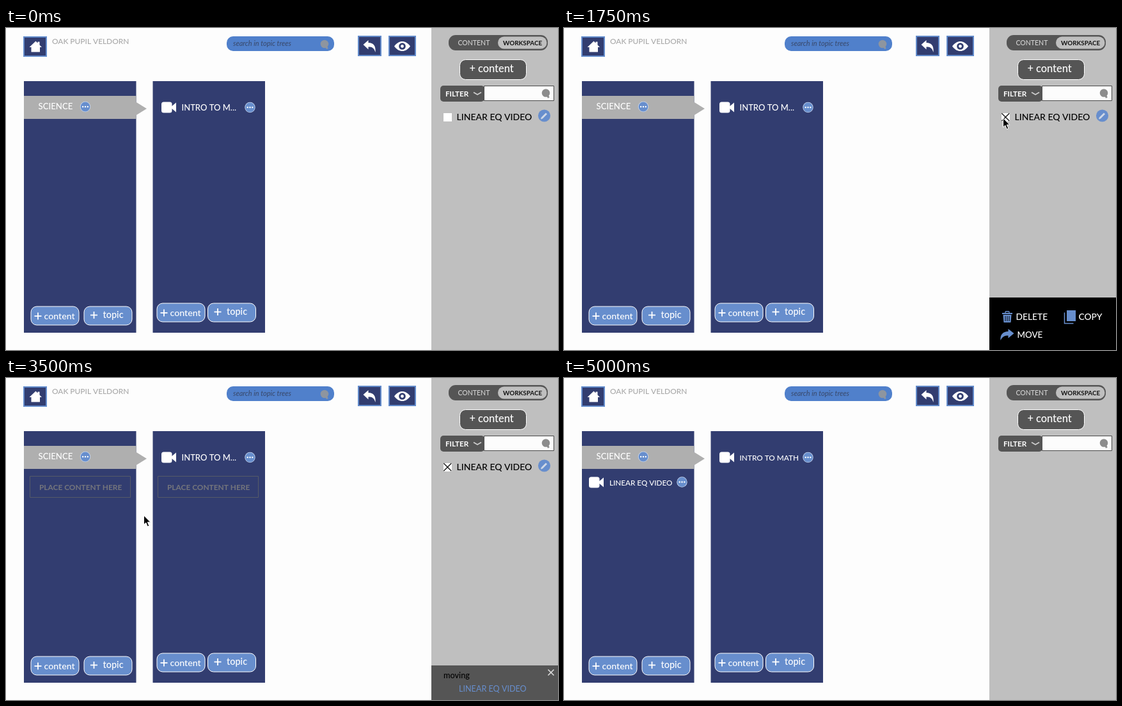
Animation, 863 px wide and 503 px high, one loop 5750 ms. Source, as an HTML page with a canvas:

```html
<!DOCTYPE html>
<html lang="en">
<head>
<meta charset="utf-8">
<title>Topic tree workspace</title>
<style>
  html, body { margin: 0; width: 100%; height: 100%; overflow: hidden; background: #fdfdfd; }
  canvas { display: block; }
</style>
</head>
<body>
<canvas id="stage" width="863" height="503"></canvas>
<script>
const ctx = document.getElementById('stage').getContext('2d');
const LOOP = 5750;
const NAVY = '#323d70', BLUE = '#678ecd', GREY = '#bfbfbf', DARK = '#555', WHITE = '#fff';

// Pointer stops: time, x, y. The pointer jumps between them.
const STOPS = [
  [500, 636, 27], [750, 698, 134], [1000, 693, 139], [1250, 688, 140],
  [1500, 685, 140], [1750, 686, 140], [2000, 685, 141], [2250, 721, 419],
  [2500, 720, 476], [2750, 722, 482], [3250, 481, 387], [3500, 215, 214],
  [3750, 148, 168], [4500, 157, 146]
];
const CHECKED = 1750, MOVING = 3250, PLACED = 4250, POINTER_END = 4750;

function rect(x, y, w, h, fill) {
  ctx.fillStyle = fill;
  ctx.fillRect(x, y, w, h);
}

function box(x, y, w, h, r, fill, stroke, width = 1) {
  ctx.beginPath();
  ctx.roundRect(x, y, w, h, r);
  if (fill) { ctx.fillStyle = fill; ctx.fill(); }
  if (stroke) { ctx.strokeStyle = stroke; ctx.lineWidth = width; ctx.stroke(); }
}

function disc(x, y, r, fill) {
  ctx.beginPath();
  ctx.arc(x, y, r, 0, Math.PI * 2);
  ctx.fillStyle = fill;
  ctx.fill();
}

function poly(points, fill) {
  ctx.beginPath();
  points.forEach(([x, y]) => ctx.lineTo(x, y));
  ctx.closePath();
  ctx.fillStyle = fill;
  ctx.fill();
}

function line(x1, y1, x2, y2, color, width) {
  ctx.beginPath();
  ctx.moveTo(x1, y1);
  ctx.lineTo(x2, y2);
  ctx.strokeStyle = color;
  ctx.lineWidth = width;
  ctx.stroke();
}

function path(d, x, y, fill, stroke, width = 1) {
  ctx.save();
  ctx.translate(x, y);
  const shape = new Path2D(d);
  if (fill) { ctx.fillStyle = fill; ctx.fill(shape); }
  if (stroke) { ctx.strokeStyle = stroke; ctx.lineWidth = width; ctx.stroke(shape); }
  ctx.restore();
}

function text(str, x, y, size, color, style = '500') {
  ctx.font = `${style} ${size}px Lato, "Open Sans", sans-serif`;
  ctx.fillStyle = color;
  ctx.fillText(str, x, y);
}

function cross(x, y, r, color, width) {
  line(x - r, y - r, x + r, y + r, color, width);
  line(x - r, y + r, x + r, y - r, color, width);
}

function plus(x, y, r = 5.5) {
  line(x - r, y, x + r, y, WHITE, 1.8);
  line(x, y - r, x, y + r, WHITE, 1.8);
}

function dots(x, y) {
  disc(x, y, 8.2, '#c9d7ef');
  disc(x, y, 7.4, BLUE);
  for (const dx of [-3.8, 0, 3.8]) disc(x + dx, y, 1.2, WHITE);
}

function camera(x, y) {
  box(x, y, 16.5, 17, 3.5, WHITE);
  poly([[x + 14, y + 8.5], [x + 23, y + 1], [x + 23, y + 16]], WHITE);
}

function lens(x, y, color) {
  disc(x, y, 6.3, color);
  line(x + 2, y + 3, x + 4.5, y + 7.5, color, 3);
}

function addButtons(x, y, topicX, topicDy) {
  box(x + .5, y + .5, 75, 29, 9, BLUE, WHITE);
  plus(x + 11.5, y + 15.5);
  text('content', x + 21, y + 20, 14.2, WHITE);
  box(topicX + .5, y + .5, 75, 29, 9, BLUE, WHITE);
  plus(topicX + 16, y + 14);
  text('topic', topicX + 30, y + topicDy, 14.5, WHITE);
}

function iconButton(x, y, w, h) {
  box(x + 1, y + 1, w - 2, h - 2, 0, NAVY, '#628bcb', 2);
}

function drawHeader() {
  iconButton(27, 13, 37, 32);
  path('M10 0L13 3V1H16V6L19.5 9.5H16.5V17H3V9.5H0Z', 36.5, 20.5, WHITE);
  text('OAK PUPIL VELDORN', 72, 24.5, 11.9, '#a9a9a9');

  box(345, 13, 168, 23, 10, '#5080cb');
  text('search in topic trees', 355, 28, 11, '#39486a', 'italic 400');
  lens(498, 25, '#8e959f');

  iconButton(550, 12, 37, 32);
  path('M0 7L8 0V4C16 4 20 9 19 19C17 12 14 10.5 8 10.5V14.5Z', 558.5, 19, WHITE);
  iconButton(598, 12, 43, 32);
  path('M0 8C7 -2 18 -2 25 8C18 18 7 18 0 8Z', 607, 20.5, WHITE);
  disc(619.5, 28.5, 5.3, NAVY);
  disc(619.5, 28.5, 2.4, WHITE);
}

function drawColumns(t) {
  rect(28, 83, 175.5, 393, NAVY);
  rect(229.5, 83, 175.5, 393, NAVY);
  rect(28, 106, 175.5, 36, '#afafaf');
  poly([[203, 115.5], [220, 126], [203, 136.5]], '#afafaf');
  text('SCIENCE', 50.5, 127, 13.2, WHITE);
  dots(124, 123);

  camera(243, 115.5);
  const placed = t >= PLACED;
  text(placed ? 'INTRO TO MATH' : 'INTRO TO M...', 274.5, 129, placed ? 11.8 : 13, WHITE);
  dots(381.5, 124);

  if (placed) {
    camera(39, 154.5);
    text('LINEAR EQ VIDEO', 71, 168, 11.7, WHITE);
    dots(184.5, 162.5);
  } else if (t >= MOVING) {
    for (const x of [37.5, 237.5]) {
      box(x, 153.5, 157, 33, 0, null, '#555a68');
      text('PLACE CONTENT HERE', x + 14.5, 175, 11.9, '#74757c', '700');
    }
  }
  addButtons(38.5, 434.5, 121.5, 18.5);
  addButtons(235.5, 429.5, 315, 18.5);
}

function drawActions() {
  rect(665, 421, 198, 82, '#000');
  // bin
  rect(685, 445, 16, 2, BLUE);
  box(690, 442.8, 6, 3, 1, null, BLUE, 1.4);
  path('M0 0H13L12 12H1Z', 686.5, 448, BLUE);
  for (const x of [690, 693, 696]) line(x, 450, x, 458, '#000', 1);
  text('DELETE', 706.5, 456, 13.8, WHITE);
  // sheets
  rect(786, 441, 14, 17, BLUE);
  path('M0 0V17H14', 782.5, 444.5, null, BLUE, 1.5);
  text('COPY', 804.5, 456, 13.8, WHITE);
  // arrow
  path('M21 7L12 0V4C4 4 -1 9 0 18C3 12 6 10.5 12 10.5V14.5Z', 682.5, 470, BLUE);
  text('MOVE', 708.5, 484, 13.4, WHITE);
}

function drawMoving() {
  rect(665, 449, 198, 54, DARK);
  text('moving', 684, 469, 12.7, '#000');
  text('LINEAR EQ VIDEO', 708, 490, 12.6, BLUE, '400');
  cross(852, 460, 4.5, '#ddd', 1.6);
}

function drawSidebar(t) {
  rect(665, 0, 198, 503, GREY);
  box(692, 11, 155, 24, 11, DARK);
  box(769, 13.5, 76.5, 19, 9.5, GREY);
  text('CONTENT', 706.5, 27, 10.5, '#d2d2d2');
  text('WORKSPACE', 777, 27, 9.9, '#111', '700');

  box(709.5, 49.5, 104, 31, 9, DARK, WHITE);
  text('+', 724.5, 69, 16.4, WHITE);
  text('content', 738, 69, 16.4, WHITE);

  box(747.5, 90.5, 109, 23, 0, '#fcfcfc', '#484848');
  box(679, 90, 69, 25, 5, DARK);
  text('FILTER', 687, 106.5, 11.7, WHITE, '700');
  path('M0 0L6 3.5L12 0', 731, 100.5, null, '#ccc', 1.8);
  lens(844, 101.5, '#8c8c8c');

  if (t < PLACED) {
    rect(684, 133, 13, 13, WHITE);
    if (t >= CHECKED) cross(690.3, 139.3, 6, '#111', 1.3);
    text('LINEAR EQ VIDEO', 704.5, 143.5, 14, '#000');
    disc(841.5, 137, 9.6, BLUE);
    line(837.8, 140.7, 845, 133.5, '#cfd8e6', 3);
    poly([[836, 142.5], [836.8, 139.5], [839, 141.7]], '#cfd8e6');
  }
  if (t >= CHECKED && t < MOVING) drawActions();
  if (t >= MOVING && t < PLACED) drawMoving();
}

function drawPointer(t) {
  if (t >= POINTER_END) return;
  const stop = STOPS.filter(([at]) => at <= t).pop();
  if (!stop) return;
  path('M.5 .8V15L3.8 12L6.3 18L8.8 17L6.3 11.2H10.8Z', stop[1], stop[2], '#000', WHITE);
}

function draw(t) {
  rect(0, 0, 863, 503, '#fdfdfd');
  drawHeader();
  drawColumns(t);
  drawSidebar(t);
  drawPointer(t);
}

const start = performance.now();
function tick() {
  draw((performance.now() - start) % LOOP);
  requestAnimationFrame(tick);
}
tick();
</script>
</body>
</html>
```
